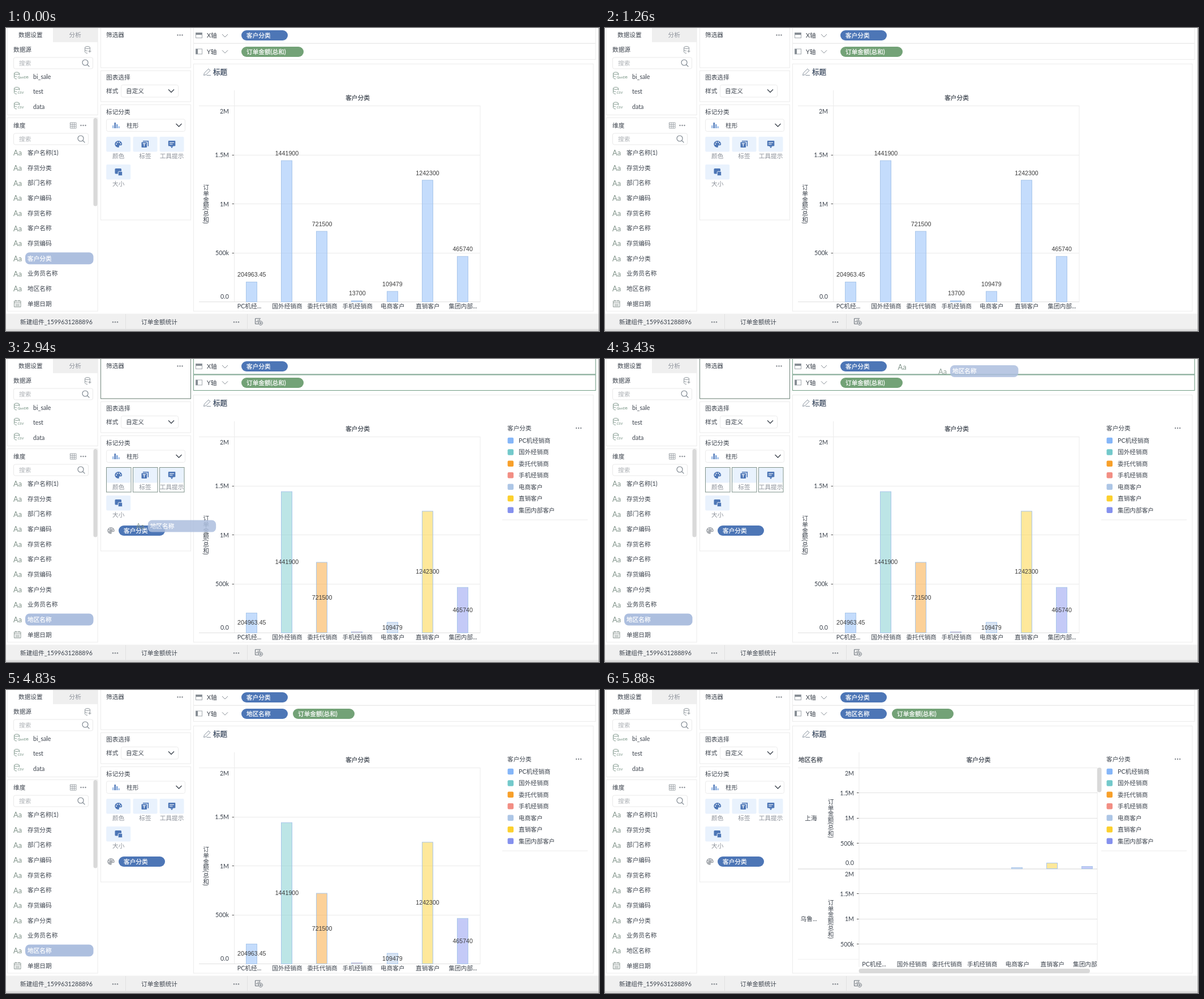
Write an HTML page that moves like this. It is 1048 px wide and 535 px high and loops after 5.95 s.

```html
<!DOCTYPE html>
<html lang="zh-CN">
<head>
<meta charset="utf-8">
<style>
html, body { margin: 0; width: 100%; height: 100%; overflow: hidden; background: #fff; }
svg { display: block; width: 1048px; height: 535px; }
text { font: 10.67px Lato, "Noto Sans CJK SC", "Noto Sans CJK", sans-serif; fill: #3d444e; white-space: pre; }
.num { font-family: "Liberation Sans", Arial, sans-serif; fill: #3c3c3c; }
.vert { writing-mode: vertical-rl; }
.semi { stroke: #3d444e; stroke-width: .25px; }
.light { stroke: #fff; stroke-width: .25px; }
</style>
</head>
<body>
<svg id="stage" viewBox="0 0 1048 535"></svg>
<script>
const LOOP = 5950, STEP = 70;
const BLUE = '#4d76b6', GREEN = '#73a277', LINE = '#ebebeb', MUTED = '#8b9099', PALE = '#e9f2fd';
const names = ['PC机经销商', '国外经销商', '委托代销商', '手机经销商', '电商客户', '直销客户', '集团内部客户'];
const short = names.map(s => s.startsWith('PC') ? 'PC机经...' : s.length > 5 ? '集团内部...' : s);
const values = [204963.45, 1441900, 721500, 13700, 109479, 1242300, 465740];
const colors = ['#85b6f8', '#73c9cb', '#f8a02a', '#f28e84', '#adc6e6', '#fcd02e', '#8591ee'];
const fields = ['客户名称(1)', '存货分类', '部门名称', '客户编码', '存货名称', '客户名称', '存货编码',
  '客户分类', '业务员名称', '地区名称', '单据日期'];
const rowY = i => 220 + 26.67 * i;

// Markup helpers; text is centred vertically on y.
const text = (x, y, s, fill = '', extra = '', size = 10.67) =>
  `<text x="${x}" y="${y + size * .36}" ${extra} style="${fill && `fill:${fill};`}font-size:${size}px">${s}</text>`;
const mid = 'text-anchor="middle"', end = 'text-anchor="end"', semi = 'class="semi"', light = 'class="light"';
const rect = (x, y, w, h, fill, r = 0, extra = '') =>
  `<rect x="${x}" y="${y}" width="${w}" height="${h}" rx="${r}" fill="${fill}" ${extra}/>`;
const box = (x, y, w, h, stroke = LINE, r = 0) => rect(x, y, w, h, 'none', r, `stroke="${stroke}"`);
const path = (d, stroke = LINE, w = 1, extra = '') =>
  `<path d="${d}" fill="none" stroke="${stroke}" stroke-width="${w}" ${extra}/>`;
const hline = (x1, x2, y, c) => path(`M${x1} ${y}H${x2}`, c);
const vline = (x, y1, y2, c) => path(`M${x} ${y1}V${y2}`, c);
const dot = (x, y, r, fill) => `<circle cx="${x}" cy="${y}" r="${r}" fill="${fill}"/>`;
const dots = (x, y, c = '#858a90') => [-4, 0, 4].map(d => dot(x + d, y, 1.2, c)).join('');
const chevron = (x, y, c = '#3c444e', w = 1.3) => path(`M${x - 5} ${y - 2.5}l5 5l5 -5`, c, w);
const lens = (x, y) => path(`M${x + 2.6} ${y + 2.6}l3.8 3.8M${x + 4} ${y - 1}a5 5 0 1 1 -10 0a5 5 0 1 1 10 0`, '#717b85', 1.1);
const aa = (x, y) => text(x, y + .8, 'Aa', '#7f9288', 'font-weight="300"', 12.8);
const pill = (x, y, w, s, fill) => rect(x, y - 9, w, 18, fill, 9) + text(x + 9, y, s, '#fff', light);
const search = (y, w) => box(13.5, y - 10, w, 20, '#e9e9e9', 3) + text(23, y, '搜索', '#aeb2b6') + lens(w + 1, y);
const fieldPill = i => rect(34, rowY(i) - 10.5, 120.5, 21, '#adbfdf', 7.5) + text(38, rowY(i), fields[i], '#fff', light);
const palette = (x, y, c) => `<path d="M${x} ${y - 6}a6.4 6 0 1 0 0 12c2.2 0 .4 -2.5 1.6 -3.4s4.8 .8 4.8 -2.6a6.4 6 0 0 0 -6.4 -6z" fill="${c}"/>` +
  [[-3.6, 0], [-2, -3], [1.6, -3.2], [3.8, -.6]].map(p => dot(x + p[0], y + p[1], 1, '#fff')).join('');

const cylinder = (x, y, c) => path(`M${x} ${y}a4.5 2 0 1 0 9 0a4.5 2 0 1 0 -9 0v8q1 2 4.5 2m-4.5 -6q1 2 4.5 2M${x + 9} ${y}v4`, c, .9);
const source = (y, name, kind) => cylinder(14.5, y - 6, '#7b9488') +
  rect(20, y - 2.5, 17, 7, '#fff') + text(20.5, y + 1, kind, '#6b8a7a', 'font-weight="700"', 5.8) + text(48, y, name);

function leftPanel() {
  let s = rect(83, 0, 79, 25, '#efefef') + box(2.5, -1, 159.5, 154.5) + box(2.5, 158.5, 159.5, 341.5);
  s += text(22, 12.5, '数据设置') + text(111.5, 12.5, '分析', MUTED) + text(13, 38, '数据源');
  s += cylinder(139.5, 34.5, '#858d93') + path('M148 38.5v5m-2.5 -2.5h5', '#858d93');
  s += search(62, 140) + source(86, 'bi_sale', 'QuoDB') + source(112.5, 'test', 'CSV') + source(139, 'data', 'CSV');
  s += text(13, 172, '维度') + path('M113.5 167h10.5v10h-10.5zv3.4h10.5m0 3.3h-10.5M117 167v10m3.5 0v-10', '#8c9298', .8);
  s += dots(136.5, 172) + search(196, 132);
  fields.forEach((f, i) => {
    s += text(38, rowY(i), f);
    if (i < 10) s += aa(13, rowY(i));
  });
  return s + path('M14.5 482h11.5v10.5h-11.5zm0 3h11.5m-8.5 -5v3m5.5 0v-3m-6.5 8h7.5m-7.5 2.3h7.5', '#7f8d88', .9);
}

function markPanel() {
  let s = box(167.5, -1, 159, 71) + box(167.5, 75.5, 159, 54.5) + box(167.5, 135.5, 159, 203.5);
  s += text(177, 12.5, '筛选器') + dots(307.5, 12.5) + text(177, 87.5, '图表选择') + text(177, 111, '样式');
  s += box(203.5, 100.5, 101, 21.5, LINE, 3) + text(212, 111, '自定义') + chevron(292, 111);
  s += text(177, 148, '标记分类') + box(177.5, 161, 139, 21.5, LINE, 3) + text(213, 172, '柱形') + chevron(305.5, 171.5);
  s += [[188, 5, '#9dbde8'], [191.5, 10, BLUE], [195, 7, '#76a0d8'], [198.5, 3.5, '#9dbde8']]
    .map(b => rect(b[0], 177 - b[1], 2.4, b[1], b[2])).join('');
  [['颜色', 198.7, 192], ['标签', 246, 192], ['工具提示', 293, 192], ['大小', 198.7, 241]].forEach(([l, x, y]) => {
    s += rect(x - 21.5, y, 43, 26.5, PALE, 2) + text(x, y + 34.5, l, MUTED, mid);
  });
  s += palette(198.7, 205, BLUE);
  s += path('M242 199.7h9.3v9', BLUE, 1.6) + rect(239.5, 201.5, 9.5, 9.5, BLUE, 1) + path('M241.8 204.2h5m-2.5 0v5', '#fff', 1.2);
  s += rect(286.8, 199, 12.5, 9.5, BLUE, 1) + path('M291 208l2 3l2 -3', BLUE, 1.5) + path('M289 202.3h8m-8 2.8h5.5', '#fff');
  return s + rect(192.5, 248, 11.5, 9.5, BLUE, 1.5) + rect(198.2, 253.3, 7.5, 7.5, BLUE, 1.5, `stroke="${PALE}"`);
}

function frameParts() {
  let s = box(331.5, -1, 710.5, 28) + box(331.5, 27.5, 710.5, 28) + box(331.5, 63.5, 706.5, 436.5);
  s += box(335.5, 8.5, 11, 9, '#a2a8ae') + rect(335.5, 8.5, 11, 3.5, '#858c93');
  s += box(335.5, 37, 11, 9, '#a2a8ae') + rect(335.5, 37, 3.5, 9, '#858c93');
  s += text(355, 13.5, 'X轴') + text(355, 41.8, 'Y轴') + chevron(387, 13.5, '#858c93', 1) + chevron(387, 41.8, '#858c93', 1);
  s += pill(416, 13, 82, '客户分类', BLUE);
  s += path('M349.5 83.5l1 -4l7.5 -7.5l3 3l-7.5 7.5zm5 0h7.5', '#7c8794', .9) + text(366, 77, '标题', '#2f4566', semi, 12.6);
  s += rect(0, 504.5, 1048, 28, '#f0f0f0') + rect(0, 531.5, 1048, 3.5, '#dcdcdc') + vline(211.5, 505, 531, '#e2e2e2') + vline(426.5, 505, 531, '#e2e2e2');
  s += text(25, 519.3, '新建组件_1599631288896') + dots(193, 519.3) + text(239, 519.3, '订单金额统计') + dots(407, 519.3);
  s += path('M450 513h-9.5v9.5h6m-3.5 -2.5v-3m2.5 3v-4.5m2.5 2.5v-4', '#666e76') + path('M450 517.5a3.5 3.5 0 1 0 .01 0m0 1.5v4m-2 -2h4', '#666e76', .9);
  return s + vline(1047.5, 0, 535, '#a8a8a8');
}

const yTitle = (x, y) => `<text class="vert" x="${x}" y="${y}">订单金额(总和)</text>`;
const barTop = v => 484 - v * 346.5 / 2e6;
const ticks = ['2M', '1.5M', '1M', '500k', '0.0'];

function plainAxes() {
  let s = text(621.5, 123.5, '客户分类', '', `${mid} ${semi}`) + vline(403.5, 110, 484) + vline(838, 137, 484);
  s += hline(341, 838, 137.5) + hline(341, 838, 483.5, '#e0e0e0') + yTitle(353.5, 276);
  ticks.forEach((l, i) => {
    const y = 137.5 + 86.6 * i;
    s += text(394, i == 0 ? 147 : i == 4 ? 474.5 : y, l, '', end);
    if (i % 4) s += hline(404, 838, Math.floor(y) + .5) + hline(399.5, 403, Math.floor(y) + .5, '#555');
  });
  short.forEach((l, i) => s += text(i ? 497 + 62.1 * (i - 1) : 430, 491, l, '', mid));
  return s;
}

const bar = (x, h, base, color) =>
  rect(Math.round(x) - 9.5, base - h, 19, h, color, 0, 'fill-opacity=".48" stroke="#a9c6ea"');

function bars(tinted) {
  return values.map((v, i) => {
    const x = 434 + 62.15 * i, y = barTop(v), h = 483.5 - y;
    const label = tinted ? y + h / 2 - .5 : y - 13;
    return bar(x, h, 483.5, tinted ? colors[i] : colors[0]) +
      (tinted && v < 2e4 ? '' : text(x + .3, label, v, '', mid + ' class="num"'));
  }).join('');
}

function splitAxes() {
  let s = text(342, 123.5, '地区名称', '', semi) + text(660, 123.5, '客户分类', '', `${mid} ${semi}`);
  s += vline(449, 110, 489) + vline(870, 137, 489) + hline(341, 870, 137.5) + hline(341, 449, 475.5, '#f2f2f2') + hline(341, 870, 316, '#d4d4d4');
  [137.5, 315.5].forEach((y0, k) => {
    s += yTitle(399, y0 + 54) + text(k ? 360 : 364, y0 + 89, k ? '乌鲁...' : '上海', '', mid);
    ticks.slice(0, k ? 4 : 5).forEach((l, i) => {
      const y = y0 + 44.4 * i;
      s += text(440, i == 0 ? y + 9.5 : i == 4 ? y - 9.5 : y, l, '', end);
      if (i % 4) s += hline(449, 870, Math.floor(y) + .5, '#e2e2e2') + hline(445, 448.5, Math.floor(y) + .5, '#555');
    });
  });
  short.forEach((l, i) => {
    if (i < 6) s += text(i ? 542.5 + 62.1 * (i - 1) : 475.5, 484, l, '', mid);
  });
  s += text(827, 484, '集团内部');
  return s + rect(448.5, 492, 408.5, 8, '#d9d9d9', 4) + rect(870, 137, 7.5, 43.5, '#d9d9d9', 3.7);
}
const splitBars = bar(728, 2, 315.5, colors[4]) + bar(790, 10, 315.5, colors[5]) + bar(852, 4, 315.5, colors[6]);

const legend = text(886, 122, '客户分类') + dots(1012, 122) + hline(877, 1028, 284) + names.map((n, i) =>
  rect(886.5, 138.7 + 20.45 * i, 10.5, 10.5, colors[i], 2) + text(906, 144 + 20.45 * i, n)).join('');
const dropZones = box(167.5, -1, 159, 71, '#71857b') + box(331.5, -1, 710.5, 28, '#6f9c83') + box(331.5, 28, 710.5, 27.5, '#6f9c83') +
  [177, 224, 271].map(x => box(x + .5, 191.5, 43.5, 43.5, '#7f928a')).join('');
const tip = rect(160, 448, 60, 24.5, '#48515f', 3) + '<path d="M160.5 455.5l-5.5 4.5l5.5 4.5z" fill="#48515f"/>' +
  text(169, 460, '地区名称', '#fff', light);
const ghost = (i, id) => `<g id="${id}" opacity=".85">${aa(13, rowY(i)) + fieldPill(i)}</g>`;

// Each layer: markup, then pairs of start and end time.
const layers = [
  [leftPanel() + markPanel() + frameParts(), 0, LOOP],
  [rect(154.5, 159, 7, 155.5, '#d9d9d9', 3.5), 0, 1190, 1960, 5600],
  [plainAxes(), 0, 5600],
  [bars(false), 0, 2380],
  [bars(true), 2380, 5600],
  [splitAxes() + splitBars, 5600, LOOP],
  [legend, 1890, LOOP],
  [palette(185.5, 303, '#a9adb2') + pill(199, 303, 82, '客户分类', BLUE), 1610, LOOP],
  [pill(416, 42, 110, '订单金额(总和)', GREEN), 0, 4830],
  [pill(416, 42, 82, '地区名称', BLUE) + pill(507, 42, 109, '订单金额(总和)', GREEN), 4830, LOOP],
  [fieldPill(7), 0, 1190],
  [fieldPill(9), 2170, 5600],
  [tip, 2240, 2660],
  [dropZones, 70, 980, 2660, 4410],
  [aa(517.5, 13.5), 3290, 3780],
  [ghost(7, 'drag1'), 70, 980],
  [ghost(9, 'drag2'), 2660, 4410]
];
const stage = document.getElementById('stage');
stage.innerHTML = layers.map(l => `<g>${l[0]}</g>`).join('');
const nodes = [...stage.children];

// Drag paths: time, dx, dy
const drags = {
  drag1: [[0, 0, 0], [490, 154, -188], [910, 160, -190]],
  drag2: [[2590, 0, 0], [3430, 576, -438.5], [4270, 395, -418]]
};
function along(keys, t) {
  let i = 0;
  while (i < keys.length - 2 && t > keys[i + 1][0]) i++;
  const a = keys[i], b = keys[i + 1];
  const p = Math.min(1, Math.max(0, (t - a[0]) / (b[0] - a[0])));
  const e = p * p * (3 - 2 * p);
  return [1, 2].map(k => a[k] + (b[k] - a[k]) * e);
}

function draw(now) {
  const t = Math.floor(now % LOOP / STEP) * STEP;
  layers.forEach(([, a, b, c, d], i) => {
    nodes[i].style.display = t >= a && t < b || t >= c && t < d ? '' : 'none';
  });
  for (const id in drags)
    document.getElementById(id).setAttribute('transform', `translate(${along(drags[id], t)})`);
}
const start = performance.now();
function tick() {
  draw(performance.now() - start);
  requestAnimationFrame(tick);
}
tick();
</script>
</body>
</html>
```
